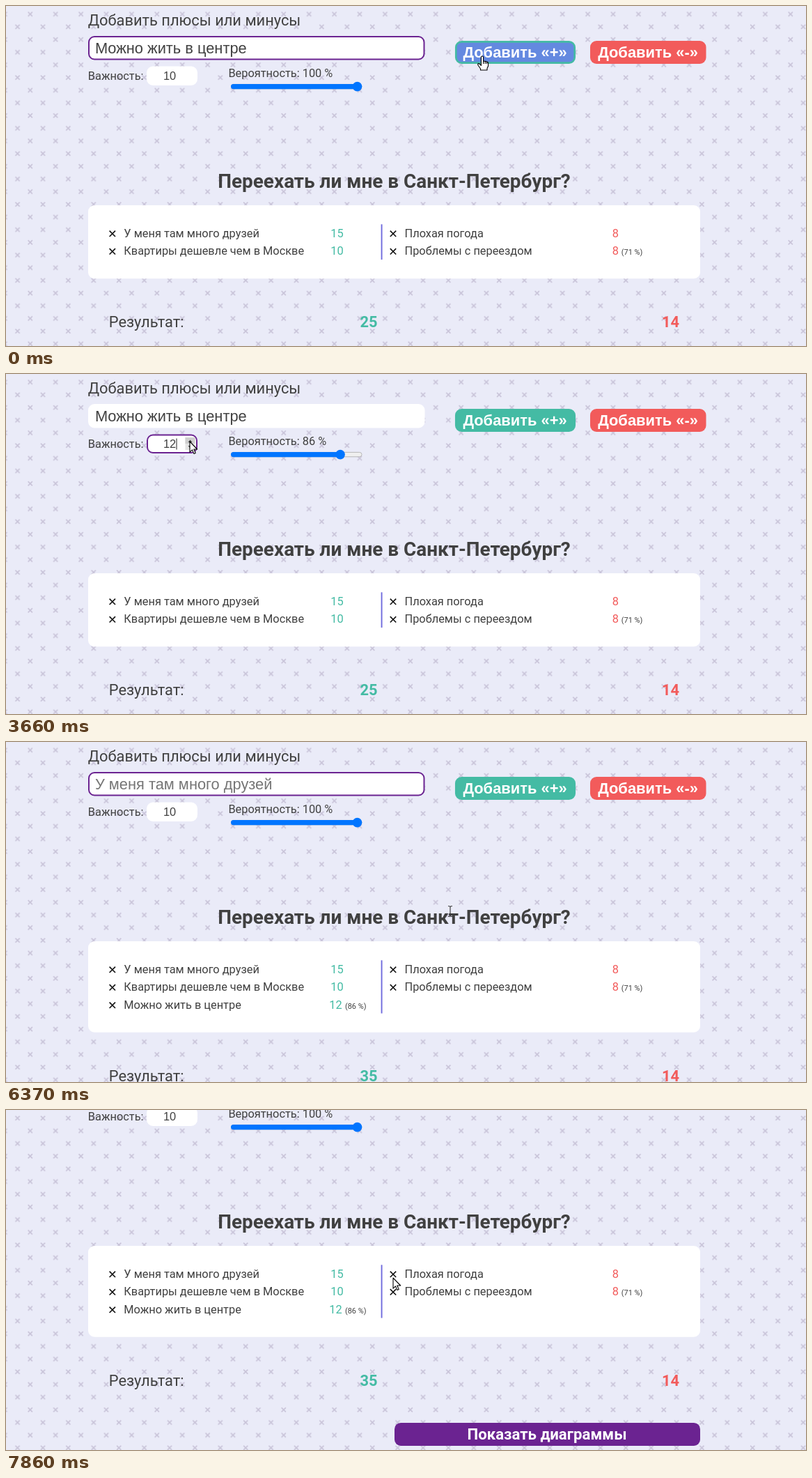
Write an HTML page that moves like this. It is 1149x488 px and loops after 8 s.

```html
<!DOCTYPE html>
<html lang="ru">
<head>
<meta charset="utf-8">
<style>
  html, body { margin: 0; width: 100%; height: 100%; overflow: hidden; background: #eaebf8; }
  svg { display: block; width: 1149px; height: 488px; }
  text { font: 16.38px Roboto, sans-serif; fill: #404040; white-space: pre; }
  .big { font-size: 21.84px; }
  .title { font-size: 27.9px; font-weight: bold; }
  .field { font: 21.84px "Liberation Sans", Arial, sans-serif; }
  .number { font: 16.38px "Liberation Sans", Arial, sans-serif; }
  .button { font: bold 21.9px "Liberation Sans", Arial, sans-serif; fill: #fff; }
  .show { font: bold 22.2px Roboto, sans-serif; fill: #fff; }
  .sum { font-size: 21.84px; font-weight: bold; }
  .pct { font-size: 10.92px; }
  .mid { text-anchor: middle; }
  .plus { fill: #44bba4; }
  .minus { fill: #f25b5b; }
  .caret { stroke: #222; stroke-width: 1; }
  .cursor { stroke: #000; fill: #fff; stroke-width: 1.1; stroke-linejoin: round; }
</style>
</head>
<body>
<svg viewBox="0 0 1149 488">
  <defs>
    <pattern id="crosses" x="7.5" y="2.6" width="36.4" height="36.4" patternUnits="userSpaceOnUse">
      <path d="M6 24.2l6.2 6.2m0-6.2l-6.2 6.2M24.2 6l6.2 6.2m0-6.2l-6.2 6.2" stroke="#c9c4d9" stroke-width="1.7"/>
    </pattern>
  </defs>
  <g id="page">
    <rect width="1149" height="700" fill="#eaebf8"/>
    <rect width="1149" height="700" fill="url(#crosses)"/>

    <text class="big mid" x="270.5" y="28">Добавить плюсы или минусы</text>
    <rect id="nameBox" x="119" y="44" width="481.5" height="32.5" rx="8" fill="#fff" stroke-width="2"/>
    <text id="name" class="field" x="127.9" y="67.6"></text>
    <path id="nameCaret" class="caret"/>

    <text class="mid" x="157.7" y="105.6">Важность:</text>
    <rect id="weightBox" x="203" y="87.5" width="71" height="25.5" rx="8" fill="#fff" stroke-width="2"/>
    <g id="spinner">
      <rect x="257.5" y="91" width="14" height="18" fill="#e4e4e4"/>
      <rect x="257.5" y="91" width="14" height="9" fill="#cfcfcf"/>
      <path d="M261.5 98l3-3.5 3 3.5zM261.5 103l3 3.5 3-3.5z" fill="#444"/>
    </g>
    <text id="weight" class="number mid" x="235" y="105.6"></text>
    <path id="weightCaret" class="caret" d="M245 92.5v16"/>

    <text id="chance" x="319.4" y="102.3"></text>
    <rect x="323.5" y="112.4" width="187.5" height="6.4" rx="3.2" fill="#efefef" stroke="#b2b2b2" stroke-width=".9"/>
    <rect id="track" x="323" y="112" width="100" height="7.2" rx="3.6"/>
    <circle id="thumb" cy="115.6" r="6.8"/>

    <rect id="add" x="646.3" y="51.3" width="170.4" height="30.4" rx="8" stroke="#44bba4" stroke-width="2.7"/>
    <text class="button mid" x="731" y="74">Добавить «+»</text>
    <rect x="839" y="50" width="166.5" height="33" rx="9" fill="#f25b5b"/>
    <text class="button mid" x="922" y="74">Добавить «-»</text>

    <text class="title mid" x="557.5" y="260.5">Переехать ли мне в Санкт-Петербург?</text>
    <rect id="card" x="118" y="286" width="879" rx="9" fill="#fff"/>
    <rect id="divider" x="538.6" y="313.3" width="1.9" fill="#6f6bdd"/>
    <g id="lists"></g>

    <g id="result">
      <text class="big mid" x="201.7" y="461">Результат:</text>
      <text id="plusSum" class="sum plus mid" x="521" y="461"></text>
      <text class="sum minus mid" x="954.5" y="461">14</text>
      <rect x="558" y="514.4" width="439" height="33" rx="9" fill="#6b2391"/>
      <text class="show mid" x="777" y="538.6">Показать диаграммы</text>
    </g>
  </g>
  <path id="arrow" class="cursor" d="M0 0V15.2L3.5 11.9 5.9 17.4 8.2 16.4 5.8 11H10.7Z"/>
  <path id="hand" class="cursor" d="M-1.6 13.5V1.6A1.6 1.6 0 0 1 1.6 1.6V7L4 7.2 6.6 8 8.6 9.2V14L7 17.5V20H-2.5V18L-6 13Q-7 10.8-5 10.6-3.6 10.6-1.6 13.5ZM1.6 7V11M4.2 7.4V11M6.6 8.2V11"/>
  <path id="beam" d="M-3-7.5Q0-7.5 0-6 0-7.5 3-7.5M0-6.5V6.5M-3 7.5Q0 7.5 0 6 0 7.5 3 7.5" fill="none" stroke="#333" stroke-width="1.1"/>
</svg>
<script>
const $ = id => document.getElementById(id);
const set = (id, attrs) => { for (const k in attrs) $(id).setAttribute(k, attrs[k]); };
const show = (id, on) => set(id, { visibility: on ? "visible" : "hidden" });
const write = (id, s) => { if ($(id).textContent !== s) $(id).textContent = s; };

const LOOP = 8000, ROW = 25.5;

// Bursts of screen updates: first time, last time, count
const bursts = [
  [0, 120, 2], [510, 930, 4], [1200, 1720, 4], [2190, 2190, 1], [2340, 3150, 7],
  [3270, 3660, 4], [4090, 4750, 6], [4900, 5050, 2], [5170, 5710, 5], [5830, 6100, 3],
  [6220, 6370, 2], [6770, 6770, 1], [6890, 7040, 2], [7320, 7860, 5]
];
const ticks = bursts.flatMap(([a, b, n]) =>
  Array.from({ length: n }, (_, i) => Math.round(n > 1 ? a + (b - a) * i / (n - 1) : a)));

// Keyframes [time, value, value...] with linear steps between
const cursorKeys = [
  [0, 684, 72], [120, 684, 72], [510, 676, 76], [650, 610, 100], [790, 530, 113], [930, 504, 114],
  [1200, 503, 115], [1720, 480, 115], [2190, 477, 116], [2475, 481, 116], [2610, 470, 114],
  [2880, 330, 105], [3150, 265, 98], [3660, 264, 97], [4090, 285, 97], [4354, 600, 83],
  [4486, 715, 75], [4750, 727, 74], [5710, 721, 79], [6100, 719, 80], [6220, 680, 150],
  [6370, 638, 243], [7320, 625, 243], [7860, 556, 241]
];
const hoverKeys = [[0, .68], [120, 1], [510, 1], [650, .4], [790, 0], [4354, 0], [4486, .5], [4618, 1], [6100, 1], [6220, 0]];
const chanceKeys = [[1200, 100], [1720, 85], [2190, 84], [2475, 86]];
const scrollKeys = [[6370, 0], [6770, 5.5], [6890, 60], [7040, 91]];

function at(keys, t) {
  const j = keys.findIndex(k => k[0] > t);
  if (j === 0) return keys[0].slice(1);
  if (j < 0) return keys[keys.length - 1].slice(1);
  const a = keys[j - 1], b = keys[j], p = (t - a[0]) / (b[0] - a[0]);
  return a.slice(1).map((v, i) => v + (b[i + 1] - v) * p);
}

function item(x, row, label, value, kind, pct = "") {
  const y = 331.6 + ROW * row, left = kind === "plus";
  const numberX = left ? (pct ? 464.3 : 466.3) : 870.7;
  return `<g id="${kind}${row}">
    <path d="M${x - 4.2} ${y - 9}l8.4 8.4m0-8.4l-8.4 8.4" stroke="#111" stroke-width="1.6"/>
    <text x="${x + 16.5}" y="${y}">${label}</text>
    <text class="${kind}" x="${numberX}" y="${y}">${value}</text>
    <text class="pct" x="${left ? 487 : 883.8}" y="${y}">${pct}</text></g>`;
}
$("lists").innerHTML =
  item(152.8, 0, "У меня там много друзей", 15, "plus") +
  item(152.8, 1, "Квартиры дешевле чем в Москве", 10, "plus") +
  item(152.8, 2, "Можно жить в центре", 12, "plus", "(86 %)") +
  item(556, 0, "Плохая погода", 8, "minus") +
  item(556, 1, "Проблемы с переездом", 8, "minus", "(71 %)");

function drawForm(t, added) {
  const nameFocus = t < 1200 || added, weightFocus = t >= 3270 && !added;
  const purple = on => ({ stroke: on ? "#6b2391" : "#fff" });
  set("nameBox", purple(nameFocus));
  set("weightBox", purple(weightFocus));
  write("name", added ? "У меня там много друзей" : "Можно жить в центре");
  $("name").style.fill = added ? "#757575" : "#404040";
  const blink = added ? (t - 4650) % 1060 < 530 : t >= 120 && t < 650;
  show("nameCaret", nameFocus && blink);
  set("nameCaret", { d: `M${added ? 129.5 : 348} 48.5v24` });

  write("weight", String(added || t < 3400 ? 10 : t < 3530 ? 11 : 12));
  show("weightCaret", weightFocus && (t - 3660 + 1060) % 1060 < 530);
  show("spinner", t >= 3150 && t < 4200);

  const chance = added ? 100 : Math.round(at(chanceKeys, t)[0]);
  const x = 330 + chance * 1.745;
  const dragging = t >= 1200 && t < 2600, hovered = t >= 930 && t < 2800;
  const fill = dragging ? "#3793ff" : hovered ? "#005cc8" : "#0075ff";
  write("chance", `Вероятность: ${chance} %`);
  set("track", { width: x - 323, fill });
  set("thumb", { cx: x, fill });

  const h = at(hoverKeys, t)[0];
  const mix = [[68, 115], [187, 113], [164, 252]].map(([a, b]) => Math.round(a + (b - a) * h));
  set("add", { fill: `rgb(${mix})` });
}

function drawCard(t, added) {
  const extra = added ? ROW : 0;
  set("card", { height: 105.2 + extra });
  set("divider", { height: 50.7 + extra });
  set("result", { transform: `translate(0 ${extra})` });
  write("plusSum", added ? "35" : "25");
  const p = added ? Math.min(1, (t - 4700) / 600) : 0;
  set("plus2", { opacity: p, transform: `translate(${30 * (1 - p) ** 2} 0)` });
}

function drawCursor(t) {
  const [x, y] = at(cursorKeys, t);
  const overButton = x > 645 && x < 818 && y > 50 && y < 83;
  const overText = t >= 6370 && x > 573;
  const kind = overButton ? "hand" : overText ? "beam" : "arrow";
  for (const id of ["arrow", "hand", "beam"]) show(id, id === kind);
  set(kind, { transform: `translate(${x} ${y})` });
}

function draw(now) {
  const time = now % LOOP;
  const t = ticks.filter(k => k <= time).pop() || 0;
  const added = t >= 4750;
  drawForm(t, added);
  drawCard(t, added);
  drawCursor(t);
  set("page", { transform: `translate(0 ${-at(scrollKeys, t < 6770 ? 0 : t)[0]})` });
}

const start = performance.now();
function frame() {
  draw(performance.now() - start);
  requestAnimationFrame(frame);
}
frame();
</script>
</body>
</html>
```
